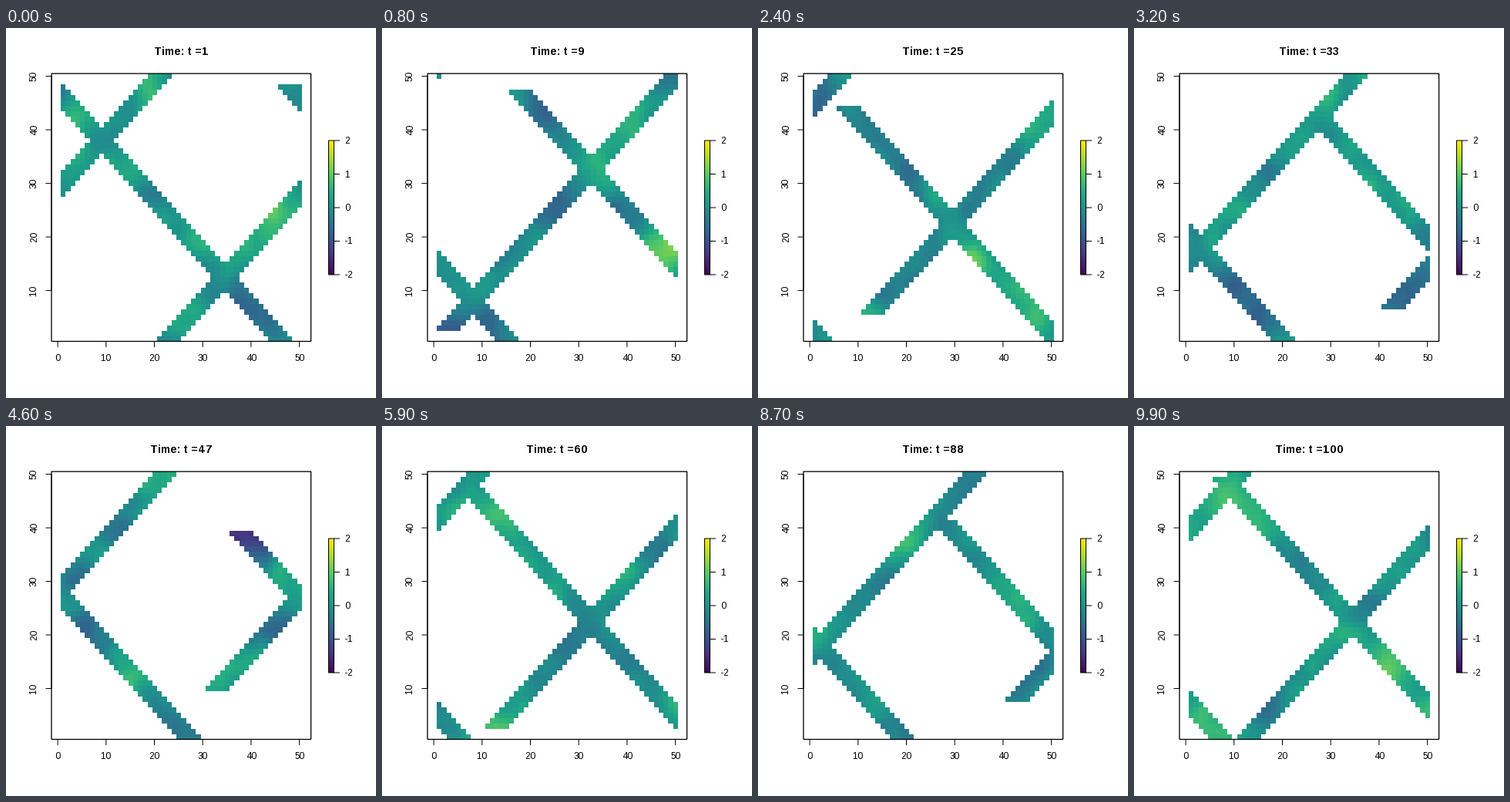
Write a matplotlib script that moves like this. It is 480x480 px and loops after 10 s.

```python
import numpy as np
import matplotlib.pyplot as plt
from matplotlib.animation import FuncAnimation
from matplotlib.patches import Rectangle

SIZE, FRAMES, INTERVAL = 480, 100, 100
N = 50
PT = 0.72  # points per pixel at 100 dpi
LEFT, RIGHT, TOP, BOTTOM = 59, 395.6, 59.1, 406.5

plt.rcParams["font.family"] = "Liberation Sans"
plt.rcParams["text.hinting_factor"] = 1  # whole-pixel letter spacing
gx, gy = np.meshgrid(np.arange(1, N + 1), np.arange(1, N + 1))


def smooth_noise(rng, scale=3.0, size=64):
    """Correlated Gaussian noise with unit variance."""
    k = 2 * np.pi * np.fft.fftfreq(size)
    k2 = k[:, None] ** 2 + k[None, :] ** 2
    spectrum = np.fft.fft2(rng.standard_normal((size, size)))
    z = np.fft.ifft2(spectrum * (1 + k2 * scale ** 2) ** -1.5).real
    return (z / z.std())[:N, :N]


def build_fields(mean=0.06, spread=0.38, rho=0.5):
    """A random field for each step, partly carried over from the last."""
    rng = np.random.default_rng(11)
    state, fields = smooth_noise(rng), []
    for _ in range(FRAMES):
        state = rho * state + np.sqrt(1 - rho ** 2) * smooth_noise(rng)
        fields.append(mean + spread * state)
    return fields


def swath(t):
    """Cells seen by the rising and the falling pass, five cells wide.

    Passes run along the row-major cell index, so crossing the right edge
    also moves one row up.
    """
    shift = 10 * (t % 50)
    row, col = divmod(12 + shift, N)
    rise = gx - gy - (col - row)
    seen = (abs(rise) <= 2) & (gy > row) | (abs(rise + N + 1) <= 2)
    row, col = divmod(2407 - shift, N)
    fall = gx + gy - (col + row + 2)
    return seen | (abs(fall) <= 2) & (gy <= row + 1) | (abs(fall + N - 1) <= 2)


fig = plt.figure(figsize=(4.8, 4.8), dpi=100, facecolor="white")
ax = fig.add_axes([0, 0, 1, 1])
ax.set(xlim=(0, SIZE), ylim=(SIZE, 0))
ax.axis("off")
ax.autoscale(False)


def line(x, y):
    ax.plot(x, y, color="black", lw=PT, solid_capstyle="round",
            snap=False, zorder=3)


def label(x, y, s, size=12, **kw):
    return ax.text(x, y, s, fontsize=size * PT, **kw)


def frame(x0, y0, x1, y1, width):
    ax.add_patch(Rectangle((x0, y0), x1 - x0, y1 - y0, fill=False,
                           ec="black", lw=width * PT, snap=False, zorder=3))


def raster(data, x0, y0, x1, y1, **kw):
    return ax.imshow(data, cmap="viridis", origin="lower", aspect="auto",
                     extent=(x0, x1, y1, y0), interpolation="nearest", **kw)


def draw_axes():
    def px(v):
        return 67.1 + 6.27 * v

    def py(v):
        return 410 - 6.948 * v

    for v in range(0, 51, 10):
        line([px(v)] * 2, [BOTTOM, BOTTOM + 7.2])
        label(px(v), 432, str(v), ha="center", va="baseline")
    for v in range(10, 51, 10):
        line([LEFT - 7.2, LEFT], [py(v)] * 2)
        label(42.8, py(v), str(v), rotation=90, ha="right", va="center")
    line([px(0), px(50)], [BOTTOM] * 2)
    line([LEFT] * 2, [py(10), py(50)])
    frame(LEFT, TOP, RIGHT, BOTTOM, 1.3)


def draw_colorbar(x0=418, y0=146, x1=426, y1=320):
    raster(np.linspace(0, 1, 256)[:, None], x0, y0, x1, y1)
    frame(x0 + 0.5, y0, x1 - 0.5, y1, 1)
    for v in range(-2, 3):
        y = (y0 + y1) / 2 - v * (y1 - y0) / 4
        line([x1 - 0.5, x1 + 6.7], [y, y])
        label(439, y + 4, str(v), ha="left", va="baseline")


fields = build_fields()
image = raster(np.zeros((N, N)), 71, 59, 384, 407, vmin=-2, vmax=2)
draw_colorbar()
draw_axes()
title = label(227.2, 35, "", 14.4, ha="center", va="baseline", weight="bold")
ax.set(xlim=(0, SIZE), ylim=(SIZE, 0))


def update(i):
    t = i + 1
    image.set_data(np.ma.masked_where(~swath(t), fields[i]))
    title.set_text(f"Time: t ={t}")
    return image, title


anim = FuncAnimation(fig, update, frames=FRAMES, interval=INTERVAL,
                     repeat=True, repeat_delay=0)
plt.show()
```
